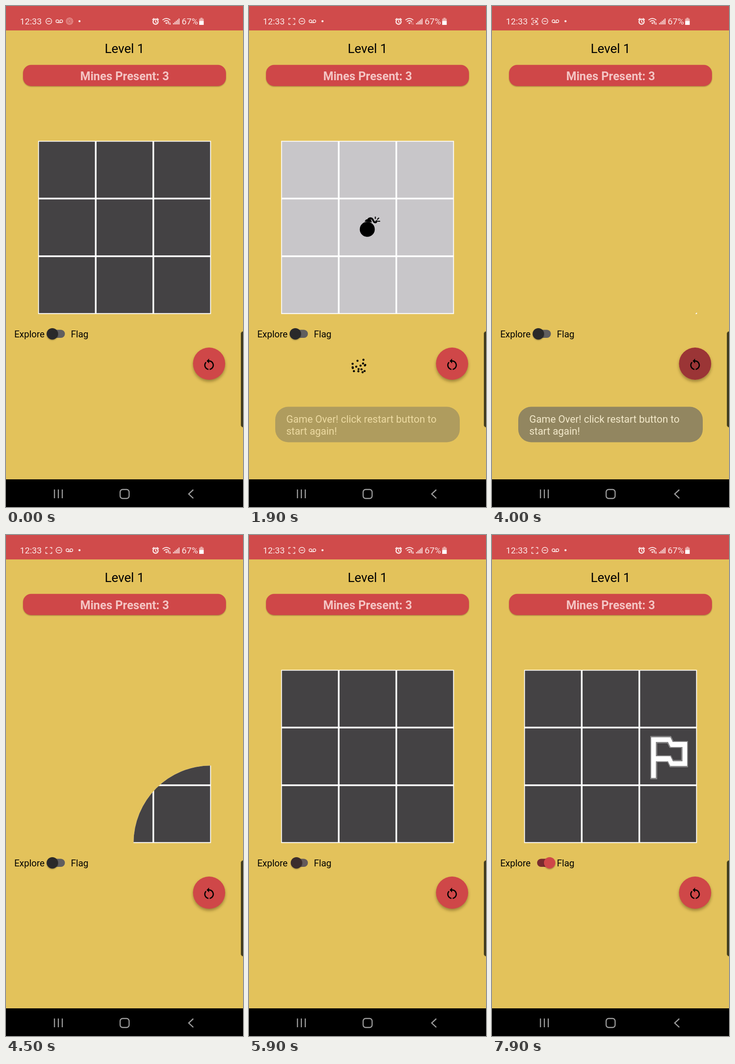
An HTML page that plays this animation: 515x1087 px, repeating every 8000 ms.

```html
<!DOCTYPE html>
<html lang="en">
<head>
<meta charset="utf-8">
<title>Mine field</title>
<style>
  html, body { margin: 0; width: 100%; height: 100%; overflow: hidden; background: #e3c25b; }
  svg { display: block; width: 100vw; height: 100vh; font-family: Roboto, sans-serif; }
  .line { fill: none; stroke: #fbe9e8; stroke-width: 1.5; }
  .pale { fill: #fbe9e8; }
  .nav { fill: none; stroke: #9d9d9d; stroke-width: 2.4; }
</style>
</head>
<body>
<svg viewBox="0 0 515 1087">
  <defs>
    <clipPath id="reveal"><circle id="revealCircle" cx="445.3" cy="668.3" r="600"/></clipPath>
    <clipPath id="fabClip"><circle cx="441.3" cy="776" r="35"/></clipPath>
    <filter id="soft" x="-30%" y="-30%" width="160%" height="160%"><feGaussianBlur stdDeviation="3"/></filter>
    <filter id="faint" x="-5%" y="-20%" width="110%" height="140%"><feGaussianBlur stdDeviation="1.2"/></filter>
  </defs>

  <rect width="515" height="1087" fill="#e3c25b"/>
  <rect width="515" height="53" fill="#d04b4b"/>

  <!-- status bar -->
  <g font-size="19" class="pale">
    <text x="30.3" y="40">12:33</text>
    <text x="381.8" y="40">67%</text>
  </g>
  <g id="recorder" class="line">
    <path d="M86.500 30.500V27h4M95.500 27h4v3.500M99.500 36.500V40h-4M90.500 40h-4v-3.500"/>
    <path id="camera" d="M89.500 31h5v5.500h-5zM95 33.500l2.500-1.800v4.200z" stroke-width="1.2"/>
  </g>
  <g id="notices">
    <g class="line">
      <circle cx="93" cy="33" r="6.3"/><path d="M89.500 33h7"/>
      <circle cx="111.500" cy="33" r="3"/><circle cx="120" cy="33" r="3"/><path d="M111.500 36.200h8.500"/>
    </g>
  </g>
  <g id="sun" fill="none" stroke="#f0b3b0">
    <circle cx="138" cy="33" r="7" stroke-width="1.8" stroke-dasharray="1.4 .8"/>
    <circle cx="138" cy="33" r="4.500" stroke-width="1.6" stroke-dasharray="1.2 .6"/>
    <circle cx="138" cy="33" r="1.600"/>
  </g>
  <circle cx="159.700" cy="33" r="2.300" class="pale"/>
  <g class="line">
    <circle cx="325" cy="34" r="5.500" stroke-width="2.4"/>
    <path d="M325 30.500V34.500l2.500 1.500M318 30l4-3.500M332 30l-4-3.500" stroke-width="1.8"/>
    <path d="M340 30.500q8.500-7 17 0M343 34q5.500-4.500 11 0" stroke-width="1.7"/>
    <path d="M346 36.500q2.500-2 5 0l-2.500 3z" fill="#fbe9e8" stroke="none"/>
    <path id="arrows" d="M352.800 40v-5m-1.500 1.500 1.500-1.500 1.500 1.500M356.300 35v5m-1.500-1.500 1.500 1.500 1.500-1.500" stroke-width="1.1"/>
    <path d="M364 40v-3M367 40v-5.500M370 40v-8M373 40v-10.500M376 40v-13" stroke-width="1.8"/>
  </g>
  <rect x="422.500" y="25.500" width="4.500" height="2.500" fill="#eba9a7"/>
  <rect x="419.800" y="27.500" width="9.800" height="6" fill="#eba9a7"/>
  <rect x="419.800" y="32.500" width="9.800" height="8.500" fill="#fff"/>

  <!-- title and counter -->
  <text x="257.500" y="101.500" font-size="27.600" text-anchor="middle">Level 1</text>
  <rect x="37" y="129" width="441" height="46" rx="18" fill="#6b4a20" opacity=".5" filter="url(#faint)"/>
  <rect x="37" y="127.700" width="441" height="46" rx="18" fill="#cf4748"/>
  <text x="257.700" y="160.500" font-size="25.400" font-weight="700" text-anchor="middle" fill="#f4c5c4">Mines Present: 3</text>

  <!-- board -->
  <g clip-path="url(#reveal)">
    <rect x="69.800" y="292.600" width="375.600" height="375.700" fill="#fff"/>
    <g id="cells"></g>
    <g id="bomb">
      <circle cx="257" cy="484.500" r="16.300"/>
      <path d="M251 467.500l3.500-4.500h10.500l2 6.500z"/>
      <path d="M257.500 468q1-7.500 7-7.500c6 0 5 9 9.500 9q3 0 3.500-4.500" fill="none" stroke="#000" stroke-width="4"/>
      <path d="M274.500 457v5M282.500 459.500l-4 4M279.500 467h5.500" fill="none" stroke="#000" stroke-width="2.200"/>
    </g>
  </g>
  <g id="flag" shape-rendering="crispEdges">
    <path id="flagShape" transform="scale(5.200)" fill="#fff" stroke="#fff" stroke-opacity=".35" stroke-width=".9" paint-order="stroke"
      d="M14 6l-1-2H5v17h2v-7h5l1 2h7V6h-6zm4 8h-4l-1-2H7V6h5l1 2h5v6z"/>
  </g>

  <!-- mode switch -->
  <g font-size="20">
    <text x="17.900" y="718.500">Explore</text>
    <text x="141" y="718.500">Flag</text>
  </g>
  <rect id="track" x="98" y="702.500" width="30" height="17.500" rx="8.700"/>
  <circle cx="1" cy="713" r="12.500" id="thumbShade" fill="#000" opacity=".25" filter="url(#faint)"/>
  <circle id="thumb" cy="711.300" r="12.400"/>

  <!-- restart button -->
  <circle cx="441.300" cy="780" r="35" fill="#4a3510" opacity=".45" filter="url(#soft)"/>
  <circle cx="441.300" cy="776" r="35" fill="#cf4748"/>
  <circle id="ripple" cx="441.300" cy="776" fill="#000" clip-path="url(#fabClip)"/>
  <path transform="translate(425.500 762.300) scale(1.310)"
    d="M12 5V2L8 6l4 4V7c3.310 0 6 2.690 6 6 0 2.970-2.170 5.430-5 5.910v2.020c3.950-.49 7-3.850 7-7.930 0-4.420-3.580-8-8-8zm-6 8c0-1.650.67-3.150 1.760-4.240L6.340 7.340C4.900 8.790 4 10.790 4 13c0 4.080 3.050 7.440 7 7.930v-2.020c-2.830-.48-5-2.940-5-5.910z"/>

  <g id="sparks"></g>

  <g id="toast" fill="#fafafa" font-size="21.900">
    <rect x="57" y="869.500" width="401" height="77" rx="28" fill="#706d63"/>
    <text x="81" y="904">Game Over! click restart button to</text>
    <text x="81" y="930">start again!</text>
  </g>

  <rect x="510.500" y="706" width="12" height="208" rx="5" fill="#3d381c" stroke="#857333" stroke-width="1"/>

  <!-- navigation bar -->
  <rect y="1027" width="515" height="60" fill="#000"/>
  <g class="nav">
    <path d="M105.300 1049v19M113.800 1049v19M122.300 1049v19"/>
    <rect x="248" y="1049" width="19.500" height="19.500" rx="5.500"/>
    <path d="M407 1049.500l-10 9.300 10 9.300"/>
  </g>
</svg>
<script>
const LOOP = 8000;
const NS = 'http://www.w3.org/2000/svg';
const $ = id => document.getElementById(id);
const set = (el, attrs) => { for (const k in attrs) el.setAttribute(k, attrs[k]); };
const add = (parent, tag, attrs) => {
  const el = document.createElementNS(NS, tag);
  set(el, attrs);
  return parent.appendChild(el);
};
const ramp = (t, from, to) => Math.min(1, Math.max(0, (t - from) / (to - from)));
const ease = p => (1 - Math.cos(p * Math.PI)) / 2;
const mix = (a, b, p) => a + (b - a) * p;
const mixColor = (a, b, p) => `rgb(${a.map((v, i) => Math.round(mix(v, b[i], p)))})`;
const show = (el, on) => el.setAttribute('visibility', on ? 'visible' : 'hidden');

const STEP = 125.2;
for (let i = 0; i < 9; i++) {
  add($('cells'), 'rect', {
    x: 71.6 + (i % 3) * STEP, y: 294.4 + Math.floor(i / 3) * STEP, width: 121.5, height: 121.5
  });
}

// start x, start y, late x, late y, late radius
const LATE = 1.2;
const sparks = [
  [226, 780, 192, 809, 2.3], [226, 789, 207, 817, 1.4], [236, 775, 226, 817, 1.3], [233, 786, 235, 814, 2],
  [238, 791, 242, 817, 1.6], [242, 785, 256, 822, 2.1], [248, 773, 274, 816, 2.1], [251, 783, 279, 808, 1.5],
  [247, 780, 280, 815, 1.3], [250, 793, 295, 801, 2.2], [243, 791, 299, 813, 4], [251, 783, 313, 817, 1.7],
  [229, 797, 190, 835, 1.3], [226, 789, 197, 831, 1.4], [238, 798, 226, 841, 1.8], [247, 799, 241, 834, 1.8]
].map(([x, y, lateX, lateY, radius]) => ({
  x, y, radius,
  drift: (lateX - x) / LATE,
  lift: (lateY - y) / (4 * (LATE * LATE - LATE)),
  el: add($('sparks'), 'circle', {})
}));

function drawSparks(t) {
  const f = 1.4 * ramp(t, 1885, 2845) ** 0.93;
  show($('sparks'), t >= 1885 && f < 1.4);
  $('sparks').setAttribute('opacity', 1 - ramp(f, 0.98, 1.46));
  for (const s of sparks) {
    set(s.el, {
      cx: s.x + s.drift * f,
      cy: s.y - 4 * s.lift * (f - f * f),
      r: Math.max(0, mix(2.3, s.radius, f / LATE))
    });
  }
}

function draw(t) {
  // status icons
  const slide = ramp(t, 100, 300);
  $('notices').setAttribute('transform', `translate(${22 * slide})`);
  $('recorder').setAttribute('opacity', slide);
  $('sun').setAttribute('opacity', 1 - ramp(t, 100, 200));
  show($('camera'), (t >= 600 && t < 1000) || (t >= 3500 && t < 4200));
  $('arrows').setAttribute('opacity', t >= 1000 && t < 3500 ? 0.4 : 1);

  // board
  const open = t >= 1650 && t < 3930;
  $('cells').setAttribute('fill', open ? '#c8c6c9' : '#444244');
  show($('bomb'), open);
  const radius = t >= 3930 && t < 5430 ? 530.5 * ease(ramp(t, 3930, 5430)) : 600;
  $('revealCircle').setAttribute('r', radius);
  drawSparks(t);
  $('toast').setAttribute('opacity', ramp(t, 1680, 2180) * (1 - ramp(t, 3850, 4350)));

  // restart press
  set($('ripple'), { r: 35 * ramp(t, 3750, 3920), opacity: 0.25 * (1 - ramp(t, 4000, 4400)) });

  // mode switch
  const on = ease(ramp(t, 5850, 6100));
  const x = mix(100.7, 125.2, on);
  set($('thumb'), { cx: x, fill: mixColor([42, 41, 42], [207, 71, 72], on) });
  $('thumbShade').setAttribute('cx', x);
  $('track').setAttribute('fill', mixColor([96, 94, 95], [122, 43, 47], on));

  // flag flying into its cell
  const fly = ease(ramp(t, 6500, 7500));
  show($('flag'), t >= 6500);
  $('flag').setAttribute('transform', `translate(${mix(252, 320, fly)} ${mix(556.500, 418, fly)})`);
}

function tick() {
  draw(performance.now() % LOOP);
  requestAnimationFrame(tick);
}
tick();
</script>
</body>
</html>
```
